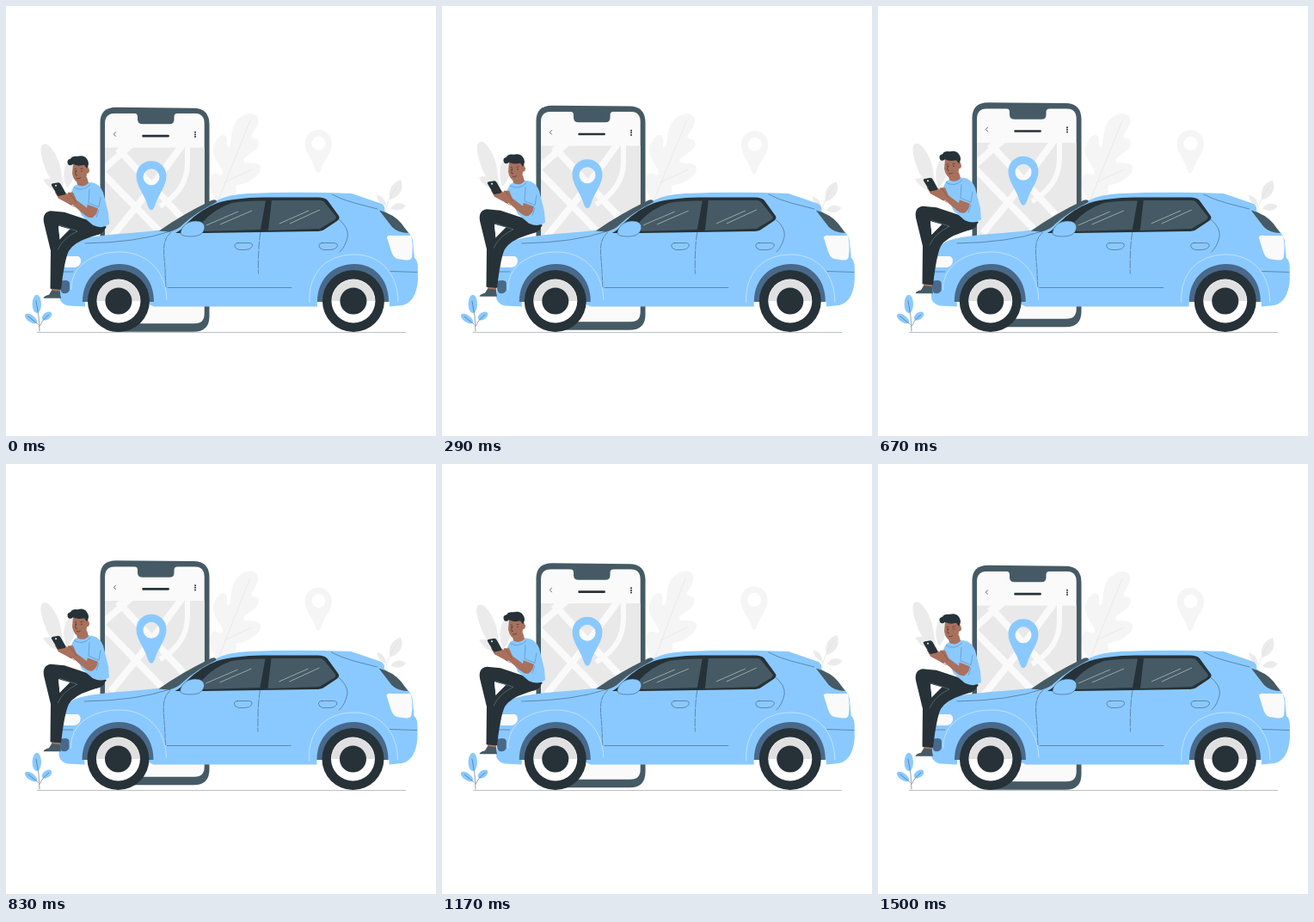
Recreate the animation shown at these times as an HTML page. Size 500 px wide and 500 px high, loop 1.54 s.

```html
<!DOCTYPE html>
<html lang="en">
<head>
<meta charset="utf-8">
<title>Car sharing</title>
<style>
html, body { margin: 0; width: 100%; height: 100%; overflow: hidden; background: #fff; }
svg { display: block; width: 100vw; height: 100vh; }
.line { fill: none; stroke: #37526c; stroke-width: .55; stroke-linecap: round; stroke-linejoin: round; }
.lite { fill: none; stroke: #e3f2ff; stroke-width: .6; stroke-linecap: round; }
.blue { fill: #8ac9ff; }
.dark { fill: #263238; }
.slate { fill: #455a64; }
.skin { fill: #a9705c; }
</style>
</head>
<body>
<svg viewBox="0 0 500 500">
<defs>
  <clipPath id="screen"><path d="M127 125H149Q153 125 153 129V132Q153 137.500 159 137.500H190Q195.500 137.500 195.500 132V129Q195.500 125 200 125H219Q230.700 125 230.700 137V358Q230.700 369.500 219 369.500H127Q115 369.500 115 358V137Q115 125 127 125Z"/></clipPath>
  <g id="wheel">
    <path d="M-42 1C-42-27-22-43 1-43S41-26 41 1Z" fill="#48698a"/>
    <circle r="36" class="dark"/>
    <circle r="25.500" fill="#fff"/>
    <path d="M-25 0A25 25 0 0 1 25 0Z" fill="#e0e0e0"/>
    <circle r="15.500" class="dark"/>
  </g>
</defs>

<g id="plants">
  <g fill="#ebebeb">
    <path d="M43 161C49 157 59 172 63 186L67 211C59 212 50 202 45 187Q37 165 43 161Z"/>
    <path d="M76 174C85 184 81 201 71 212C65 201 66 184 76 174Z"/>
    <path d="M43 202Q57 197 69 214Q54 220 43 202Z"/>
  </g>
  <path fill="#f5f5f5" d="M246 227C235 215 234 199 241 195C246 193 250 199 252 195C254 190 239 178 241 165C243 154 252 146 256 152C259 157 254 165 259 164C263 162 260 145 267 135C274 124 291 121 293 131C295 141 283 149 286 153C289 156 294 152 294 160C293 170 276 174 276 180C277 185 292 179 296 187C298 195 284 206 270 208C264 210 270 214 267 218Q260 226 246 227Z"/>
  <path d="M247 226Q264 182 284 133M254 205L286 190" fill="none" stroke="#e6e6e6" stroke-width=".8"/>
  <path fill="#f5f5f5" fill-rule="evenodd" d="M363.500 144C354 144 347.500 151 347.500 160C347.500 171 357 179 360 191Q363 198 366 191C369 179 379 171 379 160C379 151 372 144 363.500 144ZM363.500 151.500A8 8 0 0 1 363.500 167.500A8 8 0 0 1 363.500 151.500Z"/>
  <g fill="#ebebeb">
    <path d="M447 225C443 214 450 204 459 202C463 211 459 221 447 225Z"/>
    <path d="M447 235Q455 225 465 232Q458 241 447 235Z"/>
    <path d="M442 233Q432 229 431 219Q442 222 442 233Z"/>
    <path d="M440 243Q443 226 455 208" fill="none" stroke="#e0e0e0" stroke-width=".7"/>
  </g>
</g>

<g id="phone">
  <path class="slate" d="M128 118L218 118.800Q236.500 119 236.500 138V361Q236.500 379 218 379H128Q109.500 379 109.500 361V136Q109.500 118 128 118Z"/>
  <g clip-path="url(#screen)">
    <rect x="110" y="120" width="125" height="260" fill="#fafafa"/>
    <rect x="114" y="164.800" width="118" height="140" fill="#e9e9e9"/>
    <g fill="none" stroke="#fafafa" stroke-width="8">
      <path d="M112 194L184 268M122 270L160 223L204 163M130 166L206 248M112 191L146 161"/>
      <path d="M211 160V183C211 206 198 222 179 233" stroke-width="6"/>
    </g>
  </g>
  <path d="M127.800 146.600L125.300 149.200L127.800 151.800" fill="none" stroke="#37474f" stroke-width=".8"/>
  <rect x="158.300" y="149.900" width="31.500" height="2.700" rx="1" class="dark"/>
  <g class="dark"><circle cx="220" cy="147" r="1"/><circle cx="220" cy="149.600" r="1"/><circle cx="220" cy="152.200" r="1"/></g>
  <path class="blue" fill-rule="evenodd" d="M169 180.500C159 180.500 151.500 188 151.500 198C151.500 210 161 219 165 233Q169 242 173 233C177 219 186.500 210 186.500 198C186.500 188 179 180.500 169 180.500ZM169 189.500A9.500 9.500 0 0 1 169 208.500A9.500 9.500 0 0 1 169 189.500Z"/>
</g>

<g id="car">
  <path class="blue" d="M67 291Q70 280 79 274C98 265.500 145 265 180 260.500L243 227Q258 219 282 218Q340 215.500 402 218L437 230Q442 234 440 238L462 257Q470 263 473 272L475 293Q479 296 479 304V319Q477 344 461 348L446 349.500V344H362V349.500H172L160 344H92V349.500L72 348.500Q62 346 62 337L65 308Z"/>
  <path d="M178 261.500Q204 243 239 226Q245 224 245 228Q221 240 207 253Q199 261 190 262.500Z" class="slate"/>
  <path class="dark" d="M197 264Q205 260 211 252Q227 236 246 229Q266 223 299 222.500L363 222.500Q371 222.500 374 226L387 244Q389 247 385 250L370 260Q367 262 360 262L231 264Z"/>
  <g class="slate">
    <path d="M229 251Q242 236 263 229Q278 226 302 226.500L296 260L231 262Z"/>
    <path d="M309 226H365Q369 226 371 229L384 245Q384 248 380 250L365 259L305 261Z"/>
  </g>
  <path d="M233 255L270 239M249 254L286 238M318 253L352 238M330 253L365 237" fill="none" stroke="#cfd8dc" stroke-width=".6"/>
  <path class="blue" d="M203 264C204 256 211 250 221 250Q231 250 231 258C230 265 224 268 215 268Q203 268 203 264Z"/>
  <path class="line" d="M203 264C204 256 211 250 221 250Q231 250 231 258C230 265 224 268 215 268Q203 268 203 264"/>
  <path class="slate" d="M434 237.500Q451 242 460 253L468 264Q456 264 449 257Z"/>
  <path fill="#fafafa" d="M443 269Q444 266 450 267H471Q474 277 472 292Q471 296 465 295.500L455 294Q450 292 448 285Z"/>
  <path fill="#fafafa" d="M68 291H84Q88 293 87 298Q86 303 80 304H67Z"/>
  <path fill="#48698a" d="M63 320Q73 317 74 322V330Q73 335 66 334Q63 332 63 325Z"/>
  <g class="line">
    <path d="M92 276Q153 275 191 262"/>
    <path d="M192 263C182 272 183 282 185 304L186 327" stroke-dasharray="6 1.500"/>
    <path d="M188 327.500H332M64 309H78"/>
    <path d="M296 263Q293 280 293.500 311" stroke-dasharray="9 2"/>
    <path d="M387 248Q398 257 397.500 267Q395 280 388 286"/>
    <path d="M270 275.500H283Q288 276 286 280Q284 283.500 278 283.500H271Q266 282 266 279Q266 275.500 270 275.500ZM368 275.500H381Q387 276 385 280Q383 283.500 377 283.500H369Q364 282 364 279Q364 275.500 368 275.500Z"/>
    <path d="M379 219Q390 225 405 229L432 236M447 308.500L478 309.500"/>
  </g>
  <g class="lite">
    <path d="M76 330C75 302 101 286 132 286C163 286 186 307 187 341"/>
    <path d="M353 345C351 312 371 289 405 289C436 289 456 312 456 344"/>
  </g>
  <use href="#wheel" x="131" y="343"/>
  <use href="#wheel" x="404" y="343"/>
</g>

<path d="M36 379.500H465" stroke="#a9b1b5" stroke-width=".8"/>

<g>
  <g class="blue">
    <ellipse cx="35.800" cy="346.500" rx="5.200" ry="10.700"/>
    <ellipse cx="47.500" cy="360.500" rx="6.500" ry="4" transform="rotate(-35 47.500 360.500)"/>
    <ellipse cx="29" cy="363.500" rx="8.300" ry="4" transform="rotate(35 29 363.500)"/>
  </g>
  <path d="M39 378Q39 360 35 343M37 370L26 361M39.500 372Q41 366 50 359" class="line"/>
</g>

<g id="man">
  <path class="skin" d="M53 325H63V335H53Z"/>
  <path class="slate" d="M53 331L62.500 332L64 340H43.500Q44 337.500 50 336Z"/>
  <path class="dark" d="M117 257Q112 265 98 269Q79 275 73 285Q68 295 64 330L53 328L55 289Q57 276 66 268L84 250Z"/>
  <path class="dark" d="M116 255Q115 267 101 267L61 256L63 277L63 330L51.500 329L52 285L44 252Q42 240 52 238.500L68 240L101 251Z"/>
  <path d="M61 256L73 260.500L62.500 271Z" fill="#fff"/>
  <path d="M62 255L83 262Q66 270 60 284" fill="none" stroke="#78909c" stroke-width=".5"/>
  <path class="blue" d="M80 209Q90 204 100 205.500Q109 207 113 217L119 241L120 254Q112 260 101 255L88 244L79 224Q75 214 80 209Z"/>
  <path class="skin" d="M81 200L94 199L96 206Q90 212 83 208Z"/>
  <path class="skin" d="M78 184Q86 178 94 184L97 191Q97 195 94 195Q94 203 87 206Q79 206 77 195Z"/>
  <path class="dark" d="M72 184Q70 179 75 178Q77 174 83 175Q91 173 94 178Q98 183 94 189L91 185Q83 187 78 184Q74 187 72 184Z"/>
  <path d="M79.500 190L82 189.500M86.500 189.500L89.500 189M82 191Q80 195 81 197L83 197M82 200.500Q85 201.500 87 199.500" fill="none" stroke="#263238" stroke-width=".6"/>
  <circle cx="81.200" cy="192.300" r=".7" class="dark"/><circle cx="88" cy="192" r=".7" class="dark"/>
  <path class="skin" d="M77 218L83 228L76 232L61 224L57 217L60 213L69 217L77 223Z"/>
  <path class="blue" d="M78 212L90 228L81 229L75 218Z"/>
  <path class="dark" d="M53 209Q52 207 55 206.500L61 205.500Q63 205.500 64 208L69 217Q70 220 67 220L62 221Q60 222 59 219Z"/>
  <circle cx="58" cy="209" r="1" fill="#eceff1"/>
  <path class="skin" d="M95 229L107 233Q107 242 101 246Q97 248 90 242L76 230L70 223L72 217L78 217L82 226L94 235Z"/>
  <path class="blue" d="M97 210Q108 209 111 222L108 236L92 230Z"/>
  <path d="M97 213L96 229L108 234L110 222M79 211Q89 217 98 208M108 237L105 246" fill="none" stroke="#477ba7" stroke-width=".5"/>
  <path d="M74 218L77 222L82 229M73 230L80 234" fill="none" stroke="#70483c" stroke-width=".5"/>
</g>
</svg>
<script>
const LOOP = 1540, STEP = LOOP / 37, CYCLE = 1500, LEAD = 17;
const FLOAT = [[0, 0], [.5, -6.3], [1, 0]];
const WIND = [[0, 0], [.25, 1], [.75, -1], [1, 0]];
const SHAKE = [0, -1, 2, -4, 4, -4, 4, -4, 2, -1, 0].map((x, i) => [i / 10, x * .6]);
const [plants, phone, car, man] = ['plants', 'phone', 'car', 'man'].map(id => document.getElementById(id));

function at(keys, p) {
  const i = keys.findIndex(k => k[0] > p);
  const [a, from] = keys[i - 1], [b, to] = keys[i];
  return from + (to - from) * (p - a) / (b - a);
}

function draw(ms) {
  const t = Math.floor((ms % LOOP) / STEP) * STEP;
  const p = ((t + LEAD) / CYCLE) % 1;
  const lift = `translate(0 ${at(FLOAT, p)})`;
  phone.setAttribute('transform', lift);
  man.setAttribute('transform', lift);
  car.setAttribute('transform', `translate(${at(SHAKE, p)} 0)`);
  plants.setAttribute('transform', `rotate(${at(WIND, p)} 253 185)`);
}

const start = performance.now();
function tick() {
  draw(performance.now() - start);
  requestAnimationFrame(tick);
}
tick();
</script>
</body>
</html>
```
